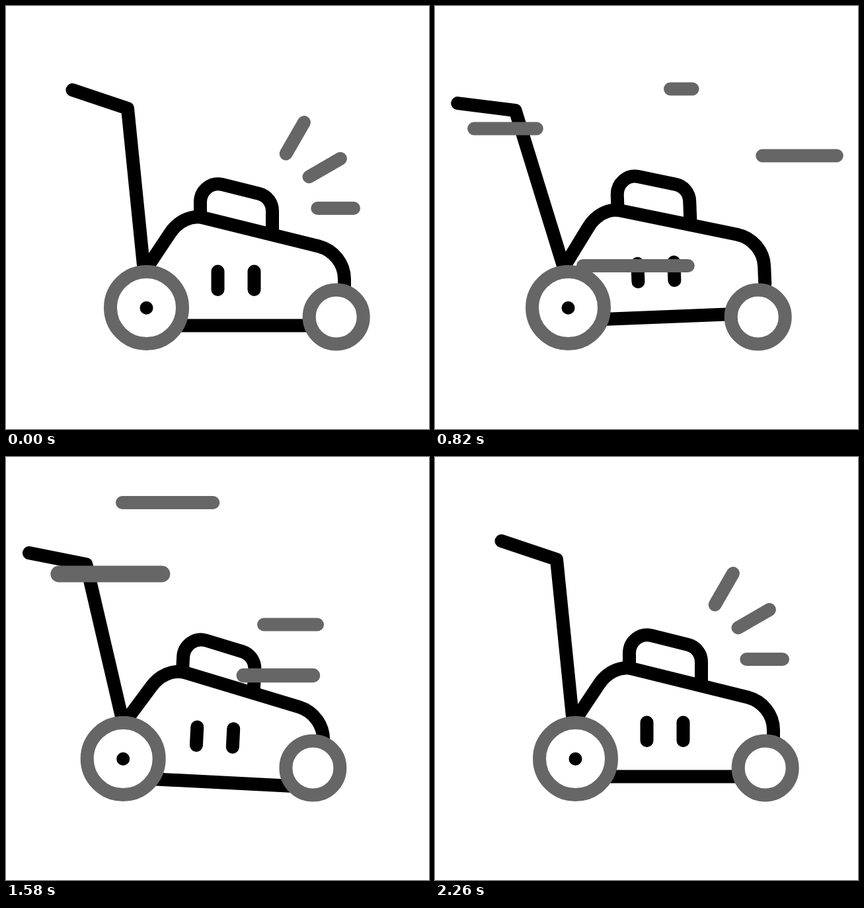
Animation of 640x640 px, one loop 2400 ms. Source, as an HTML page:

```html
<!DOCTYPE html>
<html lang="en">
<head>
<meta charset="utf-8">
<title>Lawn mower</title>
<style>
  html, body { margin: 0; width: 100%; height: 100%; overflow: hidden; background: #fff; }
  svg { display: block; width: 100%; height: 100%; }
  .ink { fill: none; stroke: #000; stroke-width: 20; stroke-linecap: round; stroke-linejoin: round; }
  .wheel { fill: #fff; stroke: #666; stroke-width: 20; }
  .dash { fill: none; stroke: #666; stroke-linecap: round; }
</style>
</head>
<body>
<svg viewBox="0 0 640 640">
  <g id="mower">
    <g id="body" class="ink">
      <path id="handle" d="M100.5 127L184 155L211 422"/>
      <path d="M204 410L248 344C259 327 279 315.5 299 320.5L473 363.5C496 369.5 512 390 512 413V440"/>
      <path d="M294 317V297C294 279 310 266 327 270L383 284C395 287 403 298 403 310V344"/>
      <path d="M225 483.5H490"/>
      <path d="M320.5 401.5V429M375.5 401.5V429"/>
    </g>
    <circle class="wheel" cx="212.5" cy="456.5" r="54.5"/>
    <circle class="wheel" cx="499.7" cy="470.5" r="41"/>
    <circle cx="212.5" cy="456.8" r="10"/>
  </g>
  <g id="lines"></g>
</svg>
<script>
  const LOOP = 2400;
  const $ = id => document.getElementById(id);

  // Eased progress over a span that begins at start
  const ease = (t, start, span) => {
    const u = Math.min(1, Math.max(0, (t - start) / span));
    return u * u * (3 - 2 * u);
  };

  // Ease from rest through [time, value] poses
  const pose = (t, ...keys) => {
    let time = 0, from = 0, value = 0;
    for (const [end, to] of keys) {
      value += (to - from) * ease(t, time, end - time);
      [time, from] = [end, to];
    }
    return value;
  };

  const addLine = (width = 20) => {
    const el = document.createElementNS('http://www.w3.org/2000/svg', 'path');
    el.setAttribute('class', 'dash');
    el.setAttribute('stroke-width', width);
    $('lines').append(el);
    return el;
  };

  const show = (el, visible, d) => el.setAttribute('d', visible ? d : '');

  // Speed lines run left in two staggered waves
  const STREAK = 500, LAG = 235;
  const wave = (start, gap, lines) => lines.map(([y, x, length, width], i) =>
    ({ y, x, length, start: start + gap * i, el: addLine(width) }));

  const streaks = [
    ...wave(216, 109, [[125.5, 556, 200], [185.5, 262, 203], [393, 437, 245], [226.5, 612, 200]]),
    ...wave(1105, 86, [[330.5, 560, 202, 21.5], [177, 291, 241, 25], [69, 325, 226], [253.5, 471, 200]])
  ];

  function drawStreak({ y, x, length, start, el }, t) {
    const head = ease(t, start, STREAK);
    const tail = ease(t, start + LAG, STREAK);
    show(el, head > tail, `M${x - length * tail} ${y}H${x - length * head}`);
  }

  // Exhaust rays fan out from one centre, 30 degrees apart
  const INNER = 95.3, OUTER = 150;
  const rays = [0, 1, 2].map(() => addLine());

  function drawRay(el, i, t) {
    const gone = ease(t, 60 * i, 260);
    const back = ease(t, 1807 + 135 * i, 160);
    const a = -i * Math.PI / 6;
    const at = f => {
      const r = INNER + (OUTER - INNER) * f;
      return `${376 + r * Math.cos(a)} ${306 + r * Math.sin(a)}`;
    };
    const [from, to] = back > 0 ? [0, back] : [gone, 1];
    show(el, to > from, `M${at(from)}L${at(to)}`);
  }

  function drawMower(t) {
    const roll = pose(t, [570, -44], [1120, 32], [1620, -36.5], [2160, 0]);
    const bob = pose(t, [340, 5.2], [820, -13.2], [1580, 8.7], [1940, -5], [2180, 0]);
    const tilt = pose(t, [640, -2.8], [1600, 2.9], [2160, 0]);
    const lean = pose(t, [580, -4.7], [1140, -15.8], [2240, 0]);
    $('mower').setAttribute('transform', `translate(${roll} 0)`);
    $('body').setAttribute('transform', `translate(0 ${bob}) rotate(${tilt} 356 482)`);
    $('handle').setAttribute('transform', `rotate(${lean} 212.5 404)`);
  }

  const t0 = performance.now();
  function tick() {
    const t = (performance.now() - t0) % LOOP;
    drawMower(t);
    streaks.forEach(s => drawStreak(s, t));
    rays.forEach((el, i) => drawRay(el, i, t));
    requestAnimationFrame(tick);
  }
  tick();
</script>
</body>
</html>
```
